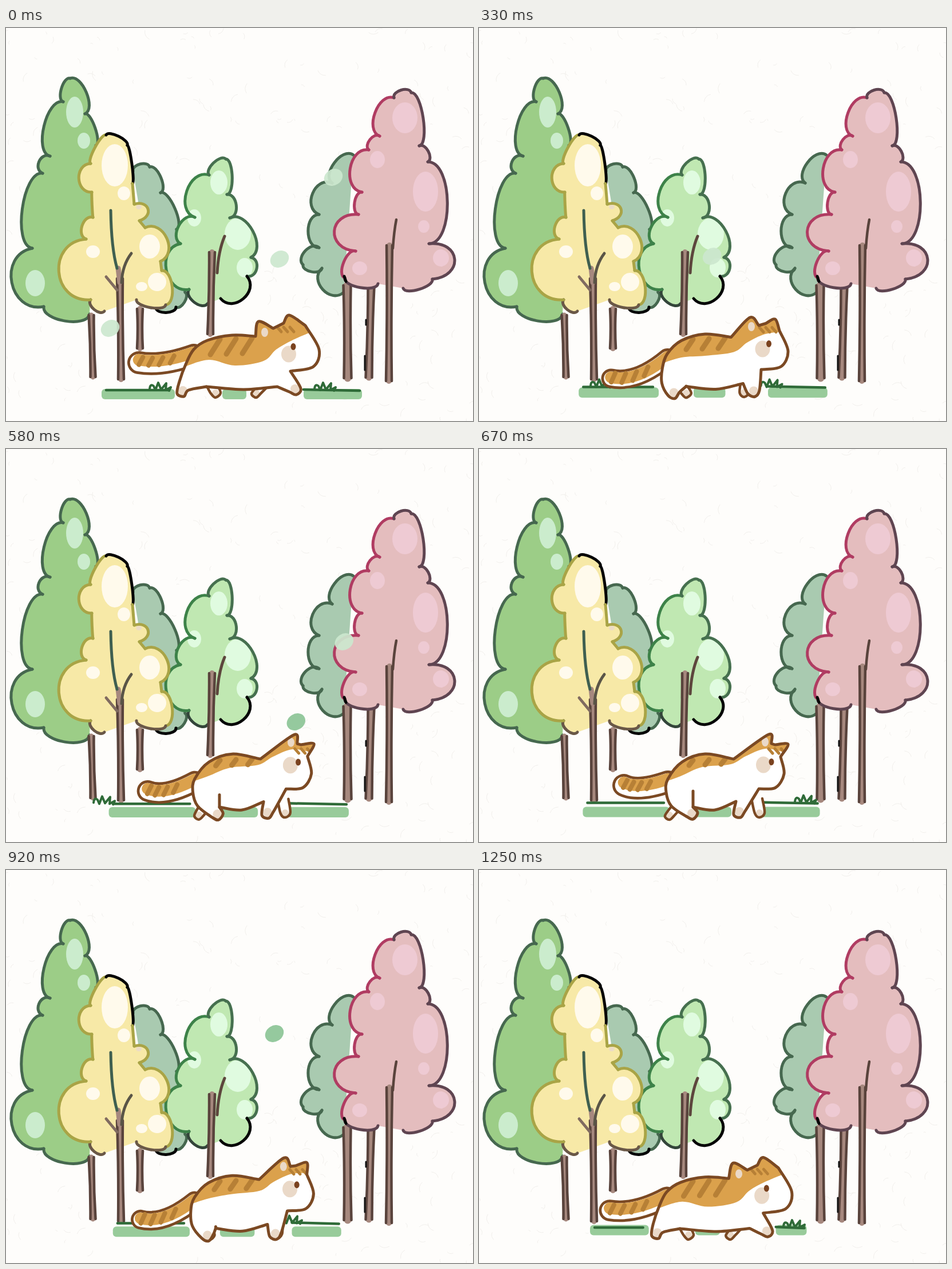
These frames come from a looping animation (816x687 px, 1.33 s). An HTML page:

```html
<!DOCTYPE html>
<html lang="en">
<head>
<meta charset="utf-8">
<title>Cat walking past trees</title>
<style>
html, body { margin: 0; width: 100%; height: 100%; overflow: hidden; background: #fefdfb; }
svg { display: block; width: 100%; height: 100%; }
</style>
</head>
<body>
<svg viewBox="0 0 816 687" fill="none" stroke-linecap="round" stroke-linejoin="round">
  <g id="paper"></g>
  <g id="trees"></g>
  <g id="scene"></g>
</svg>
<script>
const LOOP = 1330, STEPS = 16;
const $ = id => document.getElementById(id);
const mix = (a, b, k) => a + (b - a) * k;
const stroke = (d, color, width = 5) => `<path d="${d}" stroke="${color}" stroke-width="${width}"/>`;
const fill = (d, color) => `<path d="${d}" fill="${color}"/>`;
const oval = (x, y, rx, ry, color, extra = '') =>
  `<ellipse cx="${x}" cy="${y}" rx="${rx}" ry="${ry}" fill="${color}" ${extra}/>`;
const spots = (color, ...list) => list.map(s => oval(...s, color)).join('');

function drawPaper() {
  let seed = 7, d = '';
  const rnd = () => (seed = seed * 16807 % 2147483647) / 2147483647;
  for (let i = 0; i < 260; i++) {
    const a = rnd() * 6.28, l = 2 + rnd() * 9;
    d += `M${rnd() * 816} ${rnd() * 687}q${l * Math.cos(a)} ${l * Math.sin(a)} ${l * 1.6 * Math.cos(a + .6)} ${l * 1.6 * Math.sin(a + .6)}`;
  }
  return stroke(d, '#f0eeea', .9);
}

// A crown is a chain of lobes: each corner gives its place and how far the lobe before it swells.
function crown(color, start, lobes, ink) {
  let [x, y] = start, outline = `M${x} ${y}`, lines = '';
  lobes.forEach(([nx, ny, swell], i) => {
    const ox = (ny - y) * swell, oy = (x - nx) * swell;
    const arc = `C${x + ox} ${y + oy} ${nx + ox} ${ny + oy} ${nx} ${ny}`;
    lines += stroke(`M${x} ${y}${arc}`, ink(i));
    outline += arc;
    [x, y] = [nx, ny];
  });
  return { body: fill(outline, color), lines };
}

function trunk(x1, y1, x2, y2, w) {
  const edge = (s, bend) => `M${x1 + s} ${y1}Q${(x1 + x2) / 2 + s + bend} ${(y1 + y2) / 2} ${x2 + s} ${y2}`;
  return stroke(edge(0, 0), '#a6887e', w) + stroke(edge(-w / 2, 2) + edge(w / 2, -2), '#59433c', 4.5);
}

function drawTrees() {
  const dark = '#46684f', teal = '#a9cab0', olive = '#a9a446', black = '#050505', bark = '#5d463d';
  const green = crown('#9ccd87', [146, 500], [
    [66, 487, .31], [46, 385, .6], [64, 254, .27], [77, 224, .57], [100, 129, .31],
    [112, 88, .3], [138, 150, .33], [157, 205, .2]], () => dark);
  const tealLeft = crown(teal, [222, 250], [
    [251, 243, .4], [270, 288, .3], [298, 352, .23], [313, 462, 0], [297, 488, .35], [262, 489, .34]],
    i => i === 5 ? black : dark);
  const light = crown('#c0e8b2', [352, 482], [
    [320, 457, .4], [305, 377, .54], [330, 331, .45], [355, 257, .48], [384, 229, .33],
    [386, 291, .22], [391, 332, .45], [428, 401, .42], [421, 434, .55], [375, 473, .57]],
    i => i === 0 ? '#33453a' : i < 4 ? '#3d8249' : i < 9 ? '#46704f' : black);
  const yellow = crown('#f7e9a7', [172, 495], [
    [148, 475, .4], [140, 369, .65], [152, 331, .46], [150, 287, .02], [148, 237, .58], [175, 187, .16],
    [212, 205, .24], [221, 272, .07], [224, 308, 0], [233, 337, .9], [243, 349, 0],
    [270, 408, .55], [272, 424, 0], [279, 484, .33], [228, 475, .24]],
    i => i === 0 || i === 14 ? '#6a5847' : i === 6 || i === 7 ? black : olive);
  const tealRight = crown(teal, [590, 462], [
    [552, 420, .56], [519, 414, .37], [547, 384, .45], [547, 326, .44], [570, 271, .55], [607, 222, .4]], () => dark);
  const pink = crown('#e4bdbe', [650, 447], [
    [592, 437, .27], [611, 390, .32], [616, 326, .83], [622, 287, .34], [634, 213, .48], [653, 189, .42],
    [678, 122, .41], [708, 113, .4], [722, 206, .2], [737, 234, .4], [739, 377, .31], [745, 439, .9], [694, 455, .25]],
    i => i > 0 && i < 7 ? '#b03c62' : '#5f4551');

  return green.body + green.lines +
    spots('#cbeccd', [120, 147, 15, 27], [136, 197, 11, 14], [51, 446, 17, 23]) +
    trunk(149, 502, 152, 610, 9) + trunk(234, 491, 234, 560, 10) +
    tealLeft.body + tealLeft.lines + light.body +
    spots('#e0fbe0', [372, 270, 15, 21], [405, 360, 23, 28], [417, 419, 14, 17], [329, 332, 12, 15]) +
    light.lines + trunk(360, 392, 357, 535, 10) + stroke('M382 364Q371 390 369 428', bark) +
    yellow.body +
    spots('#fffaec', [190, 240, 23, 37], [206, 289, 11, 12], [152, 391, 12, 11], [251, 382, 18, 21], [237, 452, 10, 8], [264, 444, 16, 16]) +
    oval(232, 313, 5, 4, '#ecdcc5') + yellow.lines +
    trunk(199, 438, 201, 614, 10) + stroke('M196 420L199 445', '#a6887e', 9) +
    stroke('M183 319Q184 385 194 420', '#3f5f50') + stroke('M219 394Q203 415 202 445', '#5a5547') + stroke('M175 435L194 458', '#806b60') +
    tealRight.body + spots('#fefdfb') + tealRight.lines +
    trunk(596, 450, 597, 612, 13) + trunk(638, 452, 634, 611, 11) + stroke('M629 510V519M627 573V598', '#111', 3) +
    pink.body +
    spots('#eecad3', [697, 157, 22, 27], [649, 230, 13, 15], [733, 286, 22, 35], [730, 347, 10, 11], [618, 420, 13, 12], [760, 402, 14, 15]) +
    pink.lines + stroke('M591 434L594 443', black) +
    trunk(670, 380, 669, 617, 10) + stroke('M682 335Q678 355 676 385', '#59433c', 4.5);
}

// Smooth curve through points; corners stay sharp.
function curve(points, corners = [], closed = true) {
  const n = points.length;
  const at = i => closed ? (i + n) % n : Math.min(n - 1, Math.max(0, i));
  const handle = (i, side) => {
    const p = points[at(i)], q = points[at(i + side)], r = points[at(i - side)];
    const sharp = corners.includes(p);
    return p.map((v, j) => (v + (q[j] - (sharp ? v : r[j])) / (sharp ? 4 : 6)).toFixed(1));
  };
  let d = 'M' + points[0];
  for (let i = 0; i < (closed ? n : n - 1); i++) d += `C${handle(i, 1)} ${handle(i + 1, -1)} ${points[at(i + 1)]}`;
  return d + (closed ? 'Z' : '');
}

// 0 when stretched, 1 when gathered, and back again.
function gather(n) {
  const u = 1 - Math.abs(n - 8) / 8;
  return u * u * (3 - 2 * u);
}
const midStride = n => Math.sin(Math.PI * Math.abs(n - 8) / 8);

const line = '#7b4923', orange = '#dba14c', band = '#b78036', pad = '#ead9c8';

function drawTail(k, droop) {
  const root = [mix(328, 330, k), mix(572, 582, k)];
  const bend = [mix(272, 278, k), mix(592, 600, k) + droop * 26];
  const tip = [mix(232, 253, k) - droop * 12, mix(585, 588, k) + droop * 26];
  const d = `M${root}Q${bend} ${tip}`, width = 40 - droop * 6, rim = 5 - droop * 3;
  let bands = '';
  for (let t = .36; t < 1; t += .2) {
    const [x, y] = root.map((v, j) => mix(mix(v, bend[j], t), mix(bend[j], tip[j], t), t));
    bands += `M${x + 4} ${y - 10}L${x - 3} ${y + 8 - rim}`;
  }
  return stroke(d, line, width) + stroke(d, '#fff', width - 9.5) +
    `<g transform="translate(0 ${-rim})">${stroke(d, orange, width - 9.5 - rim * 2)}</g>` + stroke(bands, band, 8);
}

function drawCat(n) {
  const k = gather(n), mid = midStride(n);
  const p = (x0, y0, x1, y1, e = k) => [mix(x0, x1, e), mix(y0, y1, e)];
  const foot = ([x, y]) => [[x + 10, y - 5], [x + 2, y + 6], [x - 10, y + 1]];

  const rump = p(328, 562, 330, 577), hip = p(352, 546, 355, 547), back = p(395, 537, 395, 533), nape = p(436, 539, 445, 542);
  const earTip = p(441, 513, 506, 499), earEnd = p(467, 525, 511, 515);
  const ear2 = p(485, 516, 517, 517), ear2Tip = p(495, 502, 540, 516), brow = p(523, 520, 527, 538);
  const nose = p(547, 562, 533, 568), muzzle = p(537, 592, 518, 592), chin = p(497, 600, 489, 594);
  const elbow = p(474, 627, 449, 616), belly = p(415, 632, 412, 631), groin = p(350, 627, 374, 626);
  const hock = p(303, 618, 336, 624), thigh = p(314, 588, 327, 600);
  const frontFoot = p(505, 635, 455, 638 + mid * 4), hindFoot = p(309, 638, 372, 641 + mid * 4);

  const body = curve([rump, hip, back, nape, earTip, earEnd, ear2, ear2Tip, brow, nose, muzzle, chin,
    ...foot(frontFoot), elbow, belly, groin, ...foot(hindFoot), hock, thigh],
    [nape, earEnd, ear2, brow, chin, elbow, groin]);
  const patch = curve([p(312, 592, 318, 584), p(355, 580, 352, 572), p(400, 590, 390, 556), p(450, 582, 440, 551),
    p(472, 562, 466, 537), p(500, 546, 500, 524), p(534, 531, 534, 530)], [], false);

  const farLeg = ([x, y], [fx, fy]) => {
    const d = curve([[x - 9, y], [fx - 8, fy - 4], [fx, fy + 3], [fx + 9, fy - 5], [x + 10, y]], [], false);
    return fill(d, '#fff') + oval(fx, fy - 5, 6, 6, pad) + stroke(d, line, 4.5);
  };
  let bodyBands = '', headBands = '';
  for (let i = 0; i < 3; i++) {
    bodyBands += `M${374 + i * 28} ${544 - i}l${mix(-17, -7, k)} ${mix(27, 9, k)}`;
    headBands += `M${ear2[0] + (i - 1) * 11} ${ear2[1] + 7}l7 8`;
  }
  return drawTail(k, mid) +
    farLeg(p(359, 624, 346, 624), p(366, 643, 333, 645, k ** 3)) +
    farLeg(p(448, 626, 485, 611), p(437, 643, 490, 641)) +
    fill(body, '#fff') + `<clipPath id="body"><path d="${body}"/></clipPath><g clip-path="url(#body)">` +
    fill(patch + 'L560 480L300 480Z', orange) + stroke(bodyBands, band, 9) + stroke(headBands, band, 5) +
    [frontFoot, hindFoot].map(([x, y]) => oval(x, y - 4, 8, 8, pad)).join('') +
    oval(...p(452, 532, 500, 512), 6, 8, pad) + '</g>' +
    oval(...p(494, 570, 497, 552), 13, 14.5, pad) + oval(...p(502, 557, 511, 547), 4.5, 6, '#7a421f') +
    stroke(body, line) + stroke(`M${groin}v${-28 * k ** 6}`, line);
}

// First step, last step, starting x, drift per step.
const tufts = [[0, 7, 267, -14], [0, 6, 555, -11.6], [8, 11, 568, -24], [13, 15, 566, -9]];

function drawGround(n) {
  const k = gather(n), left = 167 + n * 1.8, right = 622 - n * 3.3, y = 640 - n * .7;
  const blade = 625 + 8 * Math.cos(n * Math.PI / 10), green = '#2f6b38';
  const rear = mix(295, 333, k), front = mix(520, 490, k);
  const turf = (a, b) => `<rect x="${a}" y="${y - 9}" width="${b - a}" height="18" rx="6" fill="#98cb9a"/>`;
  return turf(left, rear) + turf(mix(378, 372, k), mix(420, 441, k)) + turf(front, right) +
    stroke(`M${left + 8} ${blade}H${rear - 10}M${front} ${blade - 1}L${right - 4} ${blade + 1}`, green, 4.5) +
    tufts.filter(([from, to]) => n >= from && n <= to).map(([from, , x, drift]) =>
      stroke(`M${x + (n - from) * drift - 16} ${blade - 2}q1 -10 7 -5l3 7l5 -13l5 12l9 -11l-1 12l9 -5l-3 6`, green, 4)).join('');
}

// First step, last step, starting place, starting drift, colour; every leaf gathers speed alike.
const pale = '#cce8cf', deep = '#8cc596';
const leaves = [
  [0, 2, 478, 404, -33, 6, pale], [0, 2, 182, 525, -37, 6, pale], [0, 5, 572, 261, -28, 14.5, pale],
  [5, 7, 672, 297, -34, 10, pale], [5, 7, 588, 437, -34, 10, deep], [11, 13, 469, 286, -112, 64.5, deep]
];
const drawLeaves = n => leaves.filter(([from, to]) => n >= from && n <= to).map(([from, , x, y, vx, vy, color]) => {
  const t = n - from, px = x + vx * t - 3.3 * t * t, py = y + vy * t + 5 * t * t;
  return oval(px, py, 17, 14, color, `opacity=".92" transform="rotate(-32 ${px} ${py})"`);
}).join('');

$('paper').innerHTML = drawPaper();
$('trees').innerHTML = drawTrees();
const begin = performance.now();
let shown = -1;

function render() {
  const time = (performance.now() - begin) % LOOP;
  // Step times fall on whole hundredths of a second.
  let n = STEPS - 1;
  while (n > 0 && Math.floor(n * LOOP / STEPS / 10 + .5) * 10 > time) n--;
  if (n !== shown) $('scene').innerHTML = drawGround(n) + drawLeaves(n) + drawCat(n);
  shown = n;
  requestAnimationFrame(render);
}
render();
</script>
</body>
</html>
```
